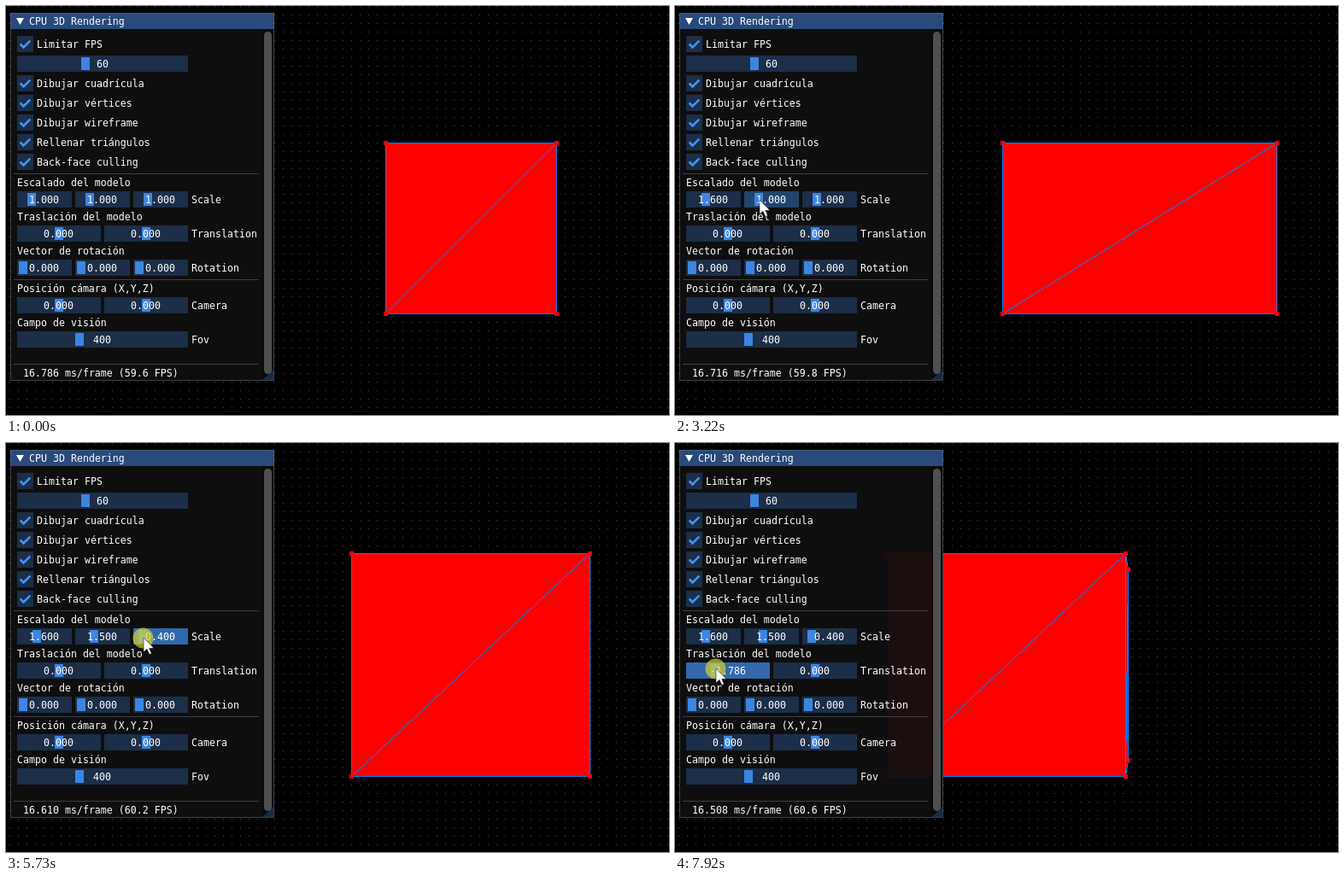
These frames come from a looping animation (776x479 px, 8000 ms). An HTML page with a canvas:

```html
<!DOCTYPE html>
<html lang="es">
<head>
<meta charset="utf-8">
<title>CPU 3D Rendering</title>
<style>
html, body { margin: 0; width: 776px; height: 479px; overflow: hidden; background: #000; }
canvas { display: block; }
</style>
</head>
<body>
<canvas id="stage" width="776" height="479"></canvas>
<script>
const ctx = document.getElementById('stage').getContext('2d');
const LOOP = 8000, STEP = 81.1, MOUSE_IN = 12;
const BLUE = '#0080ff', RED = '#f00', LINE = 'rgba(110,110,128,.5)';

// Each drag holds a slider from one step to another, easing the mouse between evenly timed stops.
// zero is the x of value 0, unit the pixels per 1.
const DRAGS = {
  sx: { from: 17, to: 30, y: 227, stops: [30, 34, 47, 27, 36], zero: 20, unit: 10, start: 1 },
  sy: { from: 42, to: 56, y: 227, stops: [98, 106, 106, 103], zero: 88, unit: 10, start: 1 },
  sz: { from: 59, to: 71, y: 228, stops: [166, 178, 178, 160], zero: 156, unit: 10, start: 1 },
  tx: { from: 82, to: 97, y: 264, stops: [62, 64, 64, 69, 47], zero: 62, unit: 8.4, start: 0 }
};

const clamp = u => Math.min(1, Math.max(0, u));
const smooth = u => u * u * (3 - 2 * u);
const mix = (a, b, u) => a + (b - a) * u;
const held = (drag, k) => k >= drag.from && k <= drag.to + 1;

function dragX({ from, to, stops }, k) {
  const legs = stops.length - 1;
  const u = clamp((k - from) / (to - from)) * legs;
  const i = Math.min(legs - 1, Math.floor(u));
  return Math.round(mix(stops[i], stops[i + 1], smooth(u - i)));
}

function valueOf(drag, k) {
  if (k < drag.from) return drag.start;
  return Math.fround((dragX(drag, k) - drag.zero) / drag.unit);
}

function mouseAt(k) {
  let last = { x: 5, y: 250, time: MOUSE_IN };
  for (const drag of Object.values(DRAGS)) {
    if (held(drag, k)) return { x: dragX(drag, k), y: drag.y, down: true };
    if (k < drag.from) {
      const u = smooth(clamp(1.3 * (k - last.time) / (drag.from - last.time)));
      return { x: Math.round(mix(last.x, drag.stops[0], u)), y: Math.round(mix(last.y, drag.y, u)) };
    }
    last = { x: drag.stops.at(-1), y: drag.y, time: drag.to + 1 };
  }
}

// Smoothed frame time: a few [step, ms] points
function frameTime(k) {
  const points = [[0, 16.786], [22, 16.534], [40, 16.716], [52, 16.533], [71, 16.61], [88, 16.663], [98, 16.508]];
  const n = points.findIndex(p => p[0] > k);
  if (n < 0) return points.at(-1)[1];
  const [a, b] = [points[n - 1], points[n]];
  return mix(a[1], b[1], (k - a[0]) / (b[0] - a[0]));
}

function box(x, y, w, h, color) {
  ctx.fillStyle = color;
  ctx.fillRect(x, y, w, h);
}
function trace(points) {
  ctx.beginPath();
  points.forEach(([x, y]) => ctx.lineTo(x, y));
}
function fill(points, color) {
  trace(points);
  ctx.fillStyle = color;
  ctx.fill();
}
function stroke(points, color, width) {
  trace(points);
  ctx.strokeStyle = color;
  ctx.lineWidth = width;
  ctx.stroke();
}
function label(text, x, middle) {
  ctx.fillStyle = '#fff';
  ctx.fillText(text, x, middle + 4);
}

// Line of whole pixels
function pixelLine([x0, y0], [x1, y1]) {
  const n = Math.max(Math.abs(x1 - x0), Math.abs(y1 - y0));
  for (let i = 0; i <= n; i++)
    box(Math.round(mix(x0, x1, i / n)), Math.round(mix(y0, y1, i / n)), 1, 1, BLUE);
}

function drawGrid() {
  for (let y = 0; y < 475; y += 10)
    for (let x = 4; x < 776; x += 10) box(x, y, 1, 1, '#505050');
}

function drawFace(quad) {
  fill(quad, RED);
  quad.forEach((p, i) => pixelLine(p, quad[(i + 1) % 4]));
  pixelLine(quad[0], quad[2]);
  quad.forEach(([x, y]) => box(x - 2, y - 2, 5, 5, RED));
}

function drawCube({ sx, sy, sz, tx }) {
  const project = (x, y, z) => {
    const f = 400 / (5 + z * sz);
    return [Math.floor(544 + (x * sx + tx) * f), Math.floor(260 + y * sy * f)];
  };
  if (tx + sx < 0)
    drawFace([project(1, 1, -1), project(1, -1, -1), project(1, -1, 1), project(1, 1, 1)]);
  drawFace([project(-1, 1, -1), project(-1, -1, -1), project(1, -1, -1), project(1, 1, -1)]);
}

function slider(x, y, w, grab, text, mouse, active) {
  const hover = mouse && !mouse.down && mouse.x >= x && mouse.x < x + w && mouse.y >= y && mouse.y < y + 19;
  box(x, y, w, 19, active ? 'rgba(66,150,250,.67)' : hover ? 'rgba(66,150,250,.4)' : 'rgba(41,74,122,.54)');
  box(Math.round(grab) - 5, y + 2, 10, 15, active ? '#4296fa' : '#3d85e0');
  label(text, Math.floor(x + w / 2 - text.length * 3.5), y + 10);
}

function checkbox(text, y) {
  box(13, y, 19, 19, 'rgba(41,74,122,.54)');
  stroke([[16.65, y + 9.5], [20.55, y + 13.4], [28.35, y + 5.6]], '#4296fa', 2.6);
  label(text, 36, y + 10);
}

function drawFrame() {
  box(5, 8, 309, 431, 'rgba(15,15,15,.94)');
  box(5, 8, 309, 19, '#294a7a');
  fill([[12, 14], [21, 14], [16.5, 22]], '#fff');
  label('CPU 3D Rendering', 27, 18);
  box(300, 27, 13, 411, 'rgba(5,5,5,.53)');
  fill([[313, 426], [313, 438], [300, 438]], 'rgba(66,150,250,.25)');
  ctx.fillStyle = '#4f4f4f';
  ctx.beginPath();
  ctx.roundRect(302, 30, 9, 401, 4.5);
  ctx.fill();
  ctx.strokeStyle = LINE;
  ctx.lineWidth = 1;
  ctx.strokeRect(5.5, 8.5, 308, 430);
  [196, 320, 419].forEach(y => box(9, y, 287, 1, LINE));
}

function drawPanel(k, state, mouse) {
  drawFrame();
  checkbox('Limitar FPS', 35);
  slider(13, 58, 200, 93, '60', mouse);
  ['Dibujar cuadrícula', 'Dibujar vértices', 'Dibujar wireframe', 'Rellenar triángulos', 'Back-face culling']
    .forEach((text, i) => checkbox(text, 81 + 23 * i));

  label('Escalado del modelo', 13, 207);
  label('Vector de rotación', 13, 287);
  ['sx', 'sy', 'sz'].forEach((id, i) => {
    const x = 13 + 68 * i;
    slider(x, 217, 64, x + 7 + state[id] * 10, state[id].toFixed(3), mouse, held(DRAGS[id], k));
    slider(x, 297, 64, x + 7, '0.000', mouse);
  });
  label('Scale', 217, 227);
  label('Rotation', 217, 307);

  label('Traslación del modelo', 13, 247);
  slider(13, 257, 98, 62 + state.tx * 8.4, state.tx.toFixed(3), mouse, held(DRAGS.tx, k));
  slider(115, 257, 98, 164, '0.000', mouse);
  label('Translation', 217, 267);

  label('Posición cámara (X,Y,Z)', 13, 331);
  slider(13, 341, 98, 62, '0.000', mouse);
  slider(115, 341, 98, 164, '0.000', mouse);
  label('Camera', 217, 351);

  label('Campo de visión', 13, 371);
  slider(13, 381, 200, 86, '400', mouse);
  label('Fov', 217, 391);

  const ms = frameTime(k);
  label(`${ms.toFixed(3)} ms/frame (${(1000 / ms).toFixed(1)} FPS)`, 20, 430);
}

function drawMouse({ x, y, down }) {
  if (down) {
    ctx.fillStyle = 'rgba(222,216,36,.66)';
    ctx.beginPath();
    ctx.arc(x + .5, y + .5, 12, 0, Math.PI * 2);
    ctx.fill();
  }
  const arrow = [[0, 0], [0, 17], [4, 13.3], [6.8, 19.5], [9.4, 18.4], [6.7, 12.4], [12, 12.2], [0, 0]]
    .map(([dx, dy]) => [x + 1 + dx, y + dy]);
  fill(arrow, '#fff');
  stroke(arrow, 'rgba(0,0,0,.7)', .7);
}

function draw(now) {
  const k = Math.min(98, Math.floor((now % LOOP + 32) / STEP));
  const state = {};
  for (const id in DRAGS) state[id] = valueOf(DRAGS[id], k);
  const mouse = k < MOUSE_IN ? null : mouseAt(k);

  ctx.font = '11.627px "DejaVu Sans Mono", monospace';
  box(0, 0, 776, 479, '#000');
  drawGrid();
  drawCube(state);
  drawPanel(k, state, mouse);
  if (mouse) drawMouse(mouse);
  requestAnimationFrame(draw);
}
requestAnimationFrame(draw);
</script>
</body>
</html>
```
